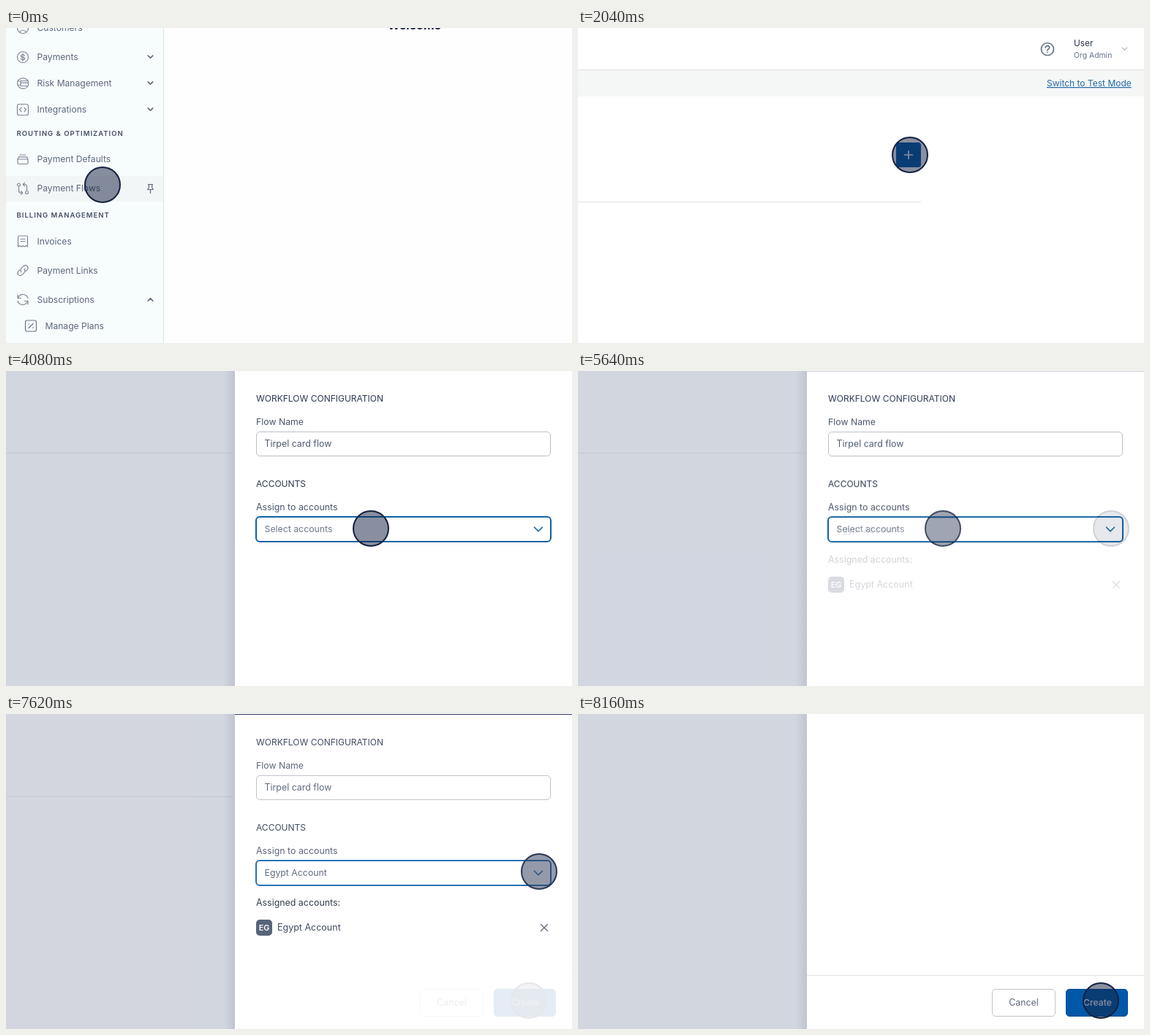
Write an HTML page that moves like this. It is 774 px wide and 432 px high and loops after 9.66 s.

```html
<!DOCTYPE html>
<html lang="en">
<head>
<meta charset="utf-8">
<title>Payment flow walkthrough</title>
<style>
  html, body { margin: 0; width: 100%; height: 100%; overflow: hidden; background: #fff; }
  svg { display: block; width: 774px; height: 432px; font-family: Inter, "Open Sans", sans-serif; }
  .line { fill: none; stroke-linecap: round; stroke-linejoin: round; }
</style>
</head>
<body>
<svg id="stage" viewBox="0 0 774 432"></svg>
<script>
const LOOP = 9660, HOLD = 1500, PERIOD = 2040, STEP = 60, STEPS = 10;

const text = (x, y, s, size, color, extra = '') =>
  `<text x="${x}" y="${y}" font-size="${size}" fill="${color}" ${extra}>${s}</text>`;
const rect = (x, y, w, h, fill, extra = '') =>
  `<rect x="${x}" y="${y}" width="${w}" height="${h}" fill="${fill}" ${extra}/>`;
const line = (d, color, width = 1.2) =>
  `<path class="line" d="${d}" stroke="${color}" stroke-width="${width}"/>`;
const at = (x, y, body) => `<g transform="translate(${x} ${y})">${body}</g>`;
const chevron = (x, y, r, color, width, dir = 1) =>
  line(`M${x - r} ${y - dir * r / 2}l${r} ${dir * r}l${r} ${-dir * r}`, color, width);
const pointer = (x, y) =>
  `<circle cx="${x}" cy="${y}" r="24" fill="#142142" fill-opacity=".5" stroke="#13203f" stroke-width="2"/>`;

// Sidebar icons, centred on 0,0
const ring = 'M-7.5 0a7.5 7.5 0 1 0 15 0a7.5 7.5 0 1 0 -15 0';
const square = 'M-5 -7.5h10a2.5 2.5 0 0 1 2.5 2.5v10a2.5 2.5 0 0 1 -2.5 2.5h-10a2.5 2.5 0 0 1 -2.5 -2.5v-10a2.5 2.5 0 0 1 2.5 -2.5z';
const icons = {
  user: ring + 'M-4.5 5.5q4.5 -5 9 0',
  coin: ring + 'M2.5 -2q-.6 -1.5 -2.5 -1.5q-2.5 0 -2.5 1.7q0 1.6 2.5 1.8q2.6 .2 2.6 1.9q0 1.6 -2.6 1.6q-2 0 -2.6 -1.5M0 -5v10',
  shield: 'M7 -4q-3 -3.5 -7 -3.5q-7 1.5 -7.5 6.5q0 6 5.5 8q6 1 9 -3M-3 -3.5h9q1.5 0 1.5 1.5v4q0 1.5 -1.5 1.5h-9zM-3 -.8h10.5M-7 -3h4M-7 2h4',
  code: square + 'M-2 -2.5l-2.5 2.5l2.5 2.5M2 -2.5l2.5 2.5l-2.5 2.5',
  stack: 'M-4 -6h8M-5.5 -3.2h11M-7 0h14v5q0 1.5 -1.5 1.5h-11q-1.5 0 -1.5 -1.5zL-5.5 -3.2M7 0L5.5 -3.2',
  flow: 'M-7.5 -5a2 2 0 1 0 4 0a2 2 0 1 0 -4 0M3.5 5.5a2 2 0 1 0 4 0a2 2 0 1 0 -4 0M-5.5 -3v6q0 3 3 3h2M-2.5 3.7l2.2 2.3l-2.2 2.3M5.5 3.5v-6q0 -3 -3 -3h-2M2.5 -7.8l-2.2 2.3l2.2 2.3',
  bill: 'M-6.5 7.5v-13q0 -2 2 -2h9q2 0 2 2v13l-2.2 -1.6l-2.2 1.6l-2.1 -1.6l-2.1 1.6l-2.2 -1.6zM-3 -3h6M-3 0h6',
  link: 'M-2 2q-2.2 -2.5 0 -4.8l3.3 -3.3q2.6 -2 4.9 .2q2 2.4 0 4.8l-2 2M2 -2q2.2 2.5 0 4.8l-3.3 3.3q-2.6 2 -4.9 -.2q-2 -2.4 0 -4.8l2 -2',
  renew: 'M-7 -6.5v4.5h4.5M-6.5 -2.5q2.5 -5 7.5 -4.5q4.5 .5 6 5M7 6.5v-4.5h-4.5M6.5 2.5q-2.5 5 -7.5 4.5q-4.5 -.5 -6 -5',
  percent: square + 'M3 -3l-6 6M-3.5 -2.5h1M2.5 2.5h1'
};
const GREY = '#7f8998', SLATE = '#5c687c', INK = '#2c3850', BLUE = '#0059a8';

const item = (y, label, icon, x = 23, color = GREY) =>
  at(x, y, line(icons[icon], color)) + text(x + 19.5, y + 4.4, label, 12.1, SLATE);
const heading = (y, label) =>
  text(14.5, y, label, 9.5, '#434e62', 'font-weight="600" letter-spacing="1"');

const menu =
  rect(0, 0, 774, 432, '#fefefe') + rect(0, 0, 215, 432, '#f7fcfc') +
  rect(215, 0, 1, 432, '#d9e4e8') + rect(0, 203, 215, 35, '#f3f6f6') +
  text(522, 2, 'Welcome', 16, '#17233d', 'font-weight="700"') +
  item(0, 'Customers', 'user') + item(40, 'Payments', 'coin') +
  item(76, 'Risk Management', 'shield') + item(112, 'Integrations', 'code') +
  heading(147.5, 'ROUTING &amp; OPTIMIZATION') +
  item(180, 'Payment Defaults', 'stack') + item(220, 'Payment Flows', 'flow') +
  heading(259.5, 'BILLING MANAGEMENT') +
  item(292.5, 'Invoices', 'bill') + item(332.5, 'Payment Links', 'link') +
  item(372.5, 'Subscriptions', 'renew') + item(408.5, 'Manage Plans', 'percent', 34, '#68748a') +
  [39.5, 75.5, 111.5].map(y => chevron(197.5, y, 3.3, SLATE, 1.5)).join('') +
  chevron(197.5, 372.5, 3.3, SLATE, 1.5, -1) +
  line('M194.5 214.5h6M195.3 214.5v4.5l-1.8 2.5h8l-1.8 -2.5v-4.5M197.5 221.5v5', SLATE) +
  pointer(132, 215);

const list =
  rect(0, 0, 774, 432, '#fff') + rect(0, 57, 774, 1, '#dfe2e5') + rect(0, 58, 774, 36, '#f5f7f7') +
  '<circle cx="642" cy="29" r="8.5" fill="none" stroke="#66738a" stroke-width="1.7"/>' +
  line('M639.3 27q.2 -2.7 2.8 -2.7q2.6 .1 2.6 2.5q0 1.5 -1.5 2.3q-1.2 .7 -1.2 1.7M642 33.4v.1', '#66738a', 1.7) +
  text(678, 25, 'User', 11.9, INK) + text(678, 41, 'Org Admin', 10.4, '#66738a') +
  chevron(747.5, 28.5, 3.3, '#aeb6c2', 1.2) +
  text(641, 80, 'Switch to Test Mode', 12, '#2168a6', 'text-decoration="underline"') +
  rect(0, 238, 469, 1, '#e0e3e6') + rect(435, 157, 34, 34, BLUE, 'rx="4"') +
  line('M446.5 174h11M452 168.5v11', '#fff', 1.6) + pointer(454, 174);

const drawer =
  rect(0, 0, 774, 432, '#d2d6df') + rect(298, 0, 15, 432, 'url(#shade)') + rect(313, 0, 461, 432, '#fff');

const form = (value, valueColor) =>
  rect(0, 112, 298, 1, '#c3c8d1') + rect(298, 112, 15, 1, '#bcc1cb') +
  text(342, 42, 'WORKFLOW CONFIGURATION', 12, INK) +
  text(342, 74, 'Flow Name', 12.3, '#4a566b') +
  rect(342.5, 83.5, 402, 33, '#fff', 'rx="4.5" stroke="#b9bfc8"') +
  text(353.5, 104, 'Tirpel card flow', 12.4, '#4f5b70') +
  text(342, 159, 'ACCOUNTS', 12, INK) +
  text(342, 191, 'Assign to accounts', 12.4, '#4a566b') +
  rect(342, 200, 403, 34, '#fff', 'rx="5" stroke="#0d63a9" stroke-width="2"') +
  text(353.5, 221, value, 12.3, valueColor) +
  chevron(728, 217, 5.5, '#0d63a9', 1.6);

const select = drawer + form('Select accounts', '#6d7889') + pointer(499, 216);

const assigned =
  drawer + at(0, 1, form('Egypt Account', '#4f5b70')) + rect(313, 0, 461, 1, '#1c2860') +
  text(342, 263, 'Assigned accounts:', 12.4, '#1d2638') +
  rect(342, 282, 22, 22, '#44526a', 'rx="5"') +
  text(353, 297, 'EG', 10.8, '#fff', 'font-weight="600" text-anchor="middle"') +
  text(371, 297, 'Egypt Account', 12.5, INK) +
  line('M731.5 288.5l9 9M740.5 288.5l-9 9', SLATE, 1.5) + pointer(729, 216);

const create =
  drawer + rect(313, 358, 461, 1, '#e0e3e7') +
  rect(566.5, 377.5, 86, 37, '#fff', 'rx="4.5" stroke="#bfc4cc"') +
  text(609.5, 400, 'Cancel', 12.4, SLATE, 'text-anchor="middle"') +
  rect(667.5, 377.5, 84, 37, BLUE, 'rx="4.5" stroke="#004b92"') +
  text(710.5, 400, 'Create', 12.2, '#fff', 'font-weight="500" text-anchor="middle"') + pointer(715, 393);

const stage = document.getElementById('stage');
stage.innerHTML =
  `<defs><linearGradient id="shade"><stop stop-color="#142142" stop-opacity="0"/>
   <stop offset="1" stop-color="#142142" stop-opacity=".1"/></linearGradient></defs>` +
  [menu, list, select, assigned, create].map(s => `<g class="scene">${s}</g>`).join('');
const scenes = [...stage.querySelectorAll('.scene')];

// Each scene fades in over the previous one in even steps; the loop ends with a cut.
function draw() {
  const t = performance.now() % LOOP;
  scenes.forEach((scene, i) => {
    if (!i) return;
    const step = Math.floor((t - HOLD - (i - 1) * PERIOD) / STEP) + 1;
    scene.setAttribute('opacity', Math.min(1, Math.max(0, step / STEPS)));
  });
  requestAnimationFrame(draw);
}
draw();
</script>
</body>
</html>
```
